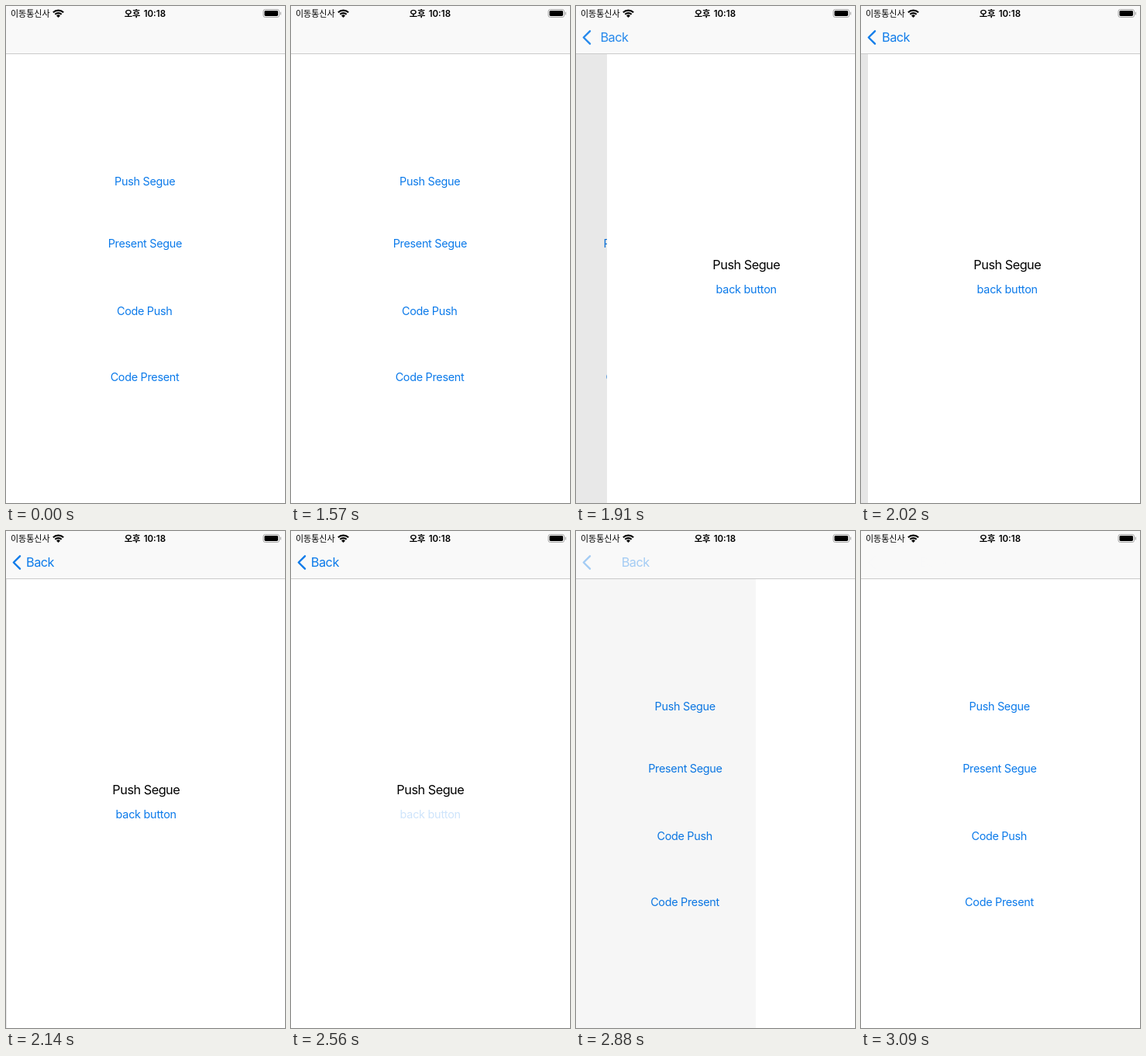
An HTML page with a canvas that plays this animation: 360x640 px, repeating every 3.19 s.

```html
<!DOCTYPE html>
<html lang="ko">
<head>
<meta charset="utf-8">
<title>Push transition</title>
<style>
html, body { margin: 0; width: 100%; height: 100%; overflow: hidden; background: #fff; }
canvas { display: block; width: 360px; height: 640px; }
</style>
</head>
<body>
<canvas id="stage" width="360" height="640"></canvas>
<script>
const ctx = document.getElementById('stage').getContext('2d');
const W = 360, H = 640, BAR = 62, LOOP = 3190;
const BLUE = '#0b7aea';
const LATIN = 'Inter, Roboto, sans-serif';
const KOREAN = '"Noto Sans CJK KR", "Noto Sans CJK", sans-serif';

const TICKS = [0, 1570, 1690, 1800, 1910, 2020, 2140, 2560, 2670, 2780, 2890, 2990, 3090];
const PUSH = { press: 1690, release: 1688.3 };
const POP = { press: 2560, release: 2651 };
const PARALLAX = 108;

const ROOT_BUTTONS = [
  ['Push Segue', 179.2, 231],
  ['Present Segue', 179.4, 311],
  ['Code Push', 178.7, 398],
  ['Code Present', 179, 483]
];

// Critically damped spring: remaining distance, from 1 down to 0.
function remaining(ms) {
  const k = Math.max(0, ms) * 0.017;
  return (1 + k) * Math.exp(-k);
}

// Share of the stage width the pushed page is away from rest.
function pageOffset(t) {
  return t < POP.release ? remaining(t - PUSH.release) : 1 - remaining(t - POP.release);
}

function buttonAlpha(t, tap) {
  if (t < tap.press) return 1;
  const fade = Math.min(1, Math.max(0, (t - tap.release) / 400));
  return 0.2 + 0.8 * fade;
}

function text(str, x, y, { size = 14.4, color = BLUE, align = 'center', alpha = 1,
                           weight = 400, family = LATIN, tracking = 0 } = {}) {
  ctx.save();
  ctx.globalAlpha *= alpha;
  ctx.font = `${weight} ${size}px ${family}`;
  ctx.letterSpacing = `${tracking}px`;
  ctx.textAlign = align;
  ctx.fillStyle = color;
  ctx.fillText(str, x, y);
  ctx.restore();
}

function rect(x, y, w, h, color) {
  ctx.fillStyle = color;
  ctx.fillRect(x, y, w, h);
}

function drawRoot(t, offset) {
  const shift = PARALLAX * (1 - offset);
  ROOT_BUTTONS.forEach(([label, x, y], i) => {
    text(label, x - shift, y, { tracking: -0.3, alpha: i ? 1 : buttonAlpha(t, PUSH) });
  });
  rect(0, BAR, W, H - BAR, `rgba(0,0,0,${0.1 * (1 - offset)})`);
}

function drawPushed(t, offset) {
  const x = Math.round(W * offset);
  rect(x, BAR, W, H - BAR, '#fff');
  text('Push Segue', x + 179.8, 338.6, { size: 16.3, color: '#000', tracking: -0.5 });
  text('back button', x + 179.7, 370, { tracking: -0.25, alpha: buttonAlpha(t, POP) });
}

function drawWifi(x, y) {
  const from = -Math.PI * 0.75, to = -Math.PI * 0.25;
  ctx.strokeStyle = ctx.fillStyle = '#000';
  ctx.lineWidth = 2.1;
  for (const r of [9.4, 5.9]) {
    ctx.beginPath();
    ctx.arc(x, y, r, from, to);
    ctx.stroke();
  }
  ctx.beginPath();
  ctx.moveTo(x, y);
  ctx.arc(x, y, 3.5, from, to);
  ctx.fill();
}

function drawBattery() {
  ctx.strokeStyle = '#a6a6a6';
  ctx.lineWidth = 1;
  ctx.beginPath();
  ctx.roundRect(332, 4.5, 20.5, 10, 2.4);
  ctx.stroke();
  ctx.fillStyle = '#000';
  ctx.beginPath();
  ctx.roundRect(333.5, 6, 17.5, 7, 1.4);
  ctx.fill();
  rect(353.8, 7.7, 1.2, 3.7, '#a6a6a6');
}

function drawBar(offset) {
  rect(0, 0, W, BAR - 1, '#f9f9f9');
  rect(0, BAR - 1, W, 1, '#cbcbcb');
  text('이동통신사', 6, 14, { size: 11, color: '#000', align: 'left', family: KOREAN });
  text('오후', 152.7, 14, { size: 11.3, color: '#000', align: 'left', weight: 700, family: KOREAN });
  text('10:18', 206, 14, { size: 11.5, color: '#000', align: 'right', weight: 600 });
  drawWifi(67.5, 15);
  drawBattery();

  ctx.save();
  ctx.globalAlpha = 1 - offset;
  ctx.strokeStyle = BLUE;
  ctx.lineWidth = 2.4;
  ctx.lineCap = ctx.lineJoin = 'round';
  ctx.beginPath();
  ctx.moveTo(18, 32.3);
  ctx.lineTo(9.8, 40.5);
  ctx.lineTo(18, 48.7);
  ctx.stroke();
  text('Back', 25.8 + 51 * offset, 46.3, { size: 16.3, align: 'left', tracking: -0.5 });
  ctx.restore();
}

function draw(now) {
  const clock = now % LOOP;
  const t = TICKS.filter(tick => tick <= clock).pop() || 0;
  const offset = pageOffset(t);
  rect(0, 0, W, H, '#fff');
  drawRoot(t, offset);
  drawPushed(t, offset);
  drawBar(offset);
}

const start = performance.now();
function loop() {
  draw(performance.now() - start);
  requestAnimationFrame(loop);
}
loop();
</script>
</body>
</html>
```
